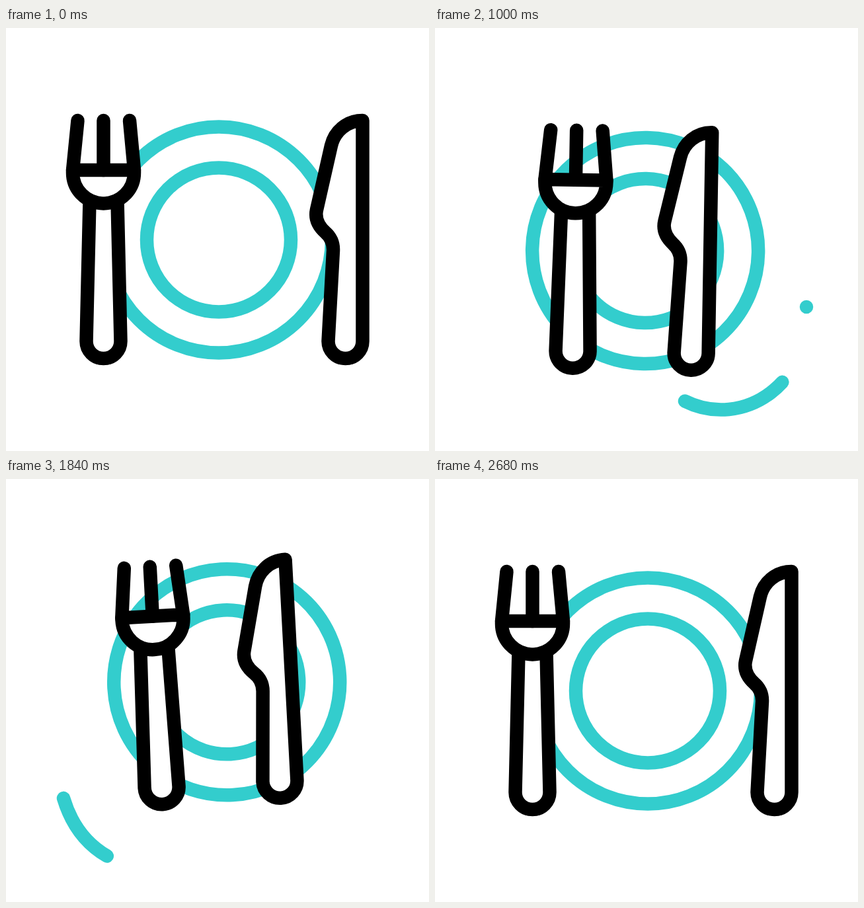
Write an HTML page that moves like this. It is 640x640 px and loops after 2940 ms.

```html
<!DOCTYPE html>
<html lang="en">
<head>
<meta charset="utf-8">
<title>Cutlery</title>
<style>
  html, body { margin: 0; height: 100%; overflow: hidden; background: #fff; }
  svg { display: block; width: 100vw; height: 100vh; }
  path, circle { fill: none; stroke: #000; stroke-width: 20.5; stroke-linecap: round; stroke-linejoin: round; }
  .teal { stroke: #33cdcd; }
  .solid { fill: #fff; }
</style>
</head>
<body>
<svg viewBox="0 0 640 640">
  <path class="teal" id="rightTrail" pathLength="1" d="M562 422A130 140 0 0 1 377 564"/>
  <path class="teal" id="leftTrail" pathLength="1" d="M87 483C114 573 194 608 304 586L321 582"/>
  <g id="sparks">
    <path class="teal" pathLength="1" d="M265 109L246 84"/>
    <path class="teal" pathLength="1" d="M308.5 93V70"/>
    <path class="teal" pathLength="1" d="M353 112L372 91"/>
  </g>
  <g id="table">
    <circle class="teal" cx="322" cy="320.5" r="171"/>
    <circle class="teal" cx="322" cy="320.5" r="109"/>
    <g id="fork">
      <path class="solid" d="M126.5 262L121.5 474A26 26 0 0 0 173.5 474L168.5 262"/>
      <path class="solid" d="M101 215V219A46.5 46.5 0 0 0 194 219V215Z"/>
      <path d="M108.5 140L101 215M147.5 140V215M187 140L194 215"/>
    </g>
    <path class="solid" id="knife" d="M539.5 140V474A26 26 0 0 1 487.5 474L495 337C495.5 326 491 316 483 309C473 300 467 289 470 275L492 178C497 157 515 140 539.5 140Z"/>
  </g>
</svg>
<script>
const LOOP = 2940;
const $ = id => document.getElementById(id);
const sparks = [...$('sparks').children];
const progress = (t, from, to) => Math.min(1, Math.max(0, (t - from) / (to - from)));
const ease = (t, from, to) => {
  const p = progress(t, from, to);
  return p * p * (3 - 2 * p);
};
const easeOut = (t, from, to) => 1 - (1 - progress(t, from, to)) ** 3;

// Eased value along [time, value] keys
function track(t, keys) {
  let value = keys[0][1];
  for (let i = 1; i < keys.length; i++)
    value += (keys[i][1] - keys[i - 1][1]) * ease(t, keys[i - 1][0], keys[i][0]);
  return value;
}

// Show only the part of a stroke between tail and head (0 to 1)
function trim(path, tail, head) {
  path.style.display = head > 0 && tail < 1 ? '' : 'none';
  path.setAttribute('stroke-dasharray', `0 ${tail} ${Math.max(0.0001, head - tail)} 2`);
}

const swayX = [[160, 0], [740, 27.5], [1235, -30.5], [1900, 13.2], [2370, 0]];
const swayY = [[160, 0], [520, -12], [1240, 26.5], [1800, -13.5], [2240, 0]];
const tilt = [[160, 0], [460, 26], [920, 0], [1240, 0], [1480, 14], [1830, 0]];

function draw(t) {
  const x = track(t, swayX), y = track(t, swayY);
  const angle = track(t, tilt);
  const back = ease(t, 1970, 2680);
  const forkX = 67.5 * (ease(t, 160, 640) - back);
  const knifeX = -119.4 * (ease(t, 160, 480) - back);

  $('table').setAttribute('transform', `translate(${x} ${y}) rotate(${-x / 4} 322 320.5)`);
  $('fork').setAttribute('transform', `translate(${forkX}) rotate(${angle} 147.5 399)`);
  $('knife').setAttribute('transform', `translate(${knifeX}) rotate(${-1.09 * angle} 513 379)`);

  trim($('rightTrail'), ease(t, 790, 1255), easeOut(t, 420, 1110));
  trim($('leftTrail'), ease(t, 2155, 2640), easeOut(t, 1735, 2425));

  const beat = t < 1200 ? t : t - 975;
  for (const spark of sparks) trim(spark, ease(beat, 785, 860), ease(beat, 600, 718));
}

const start = performance.now();
(function frame() {
  draw((performance.now() - start) % LOOP);
  requestAnimationFrame(frame);
})();
</script>
</body>
</html>
```
